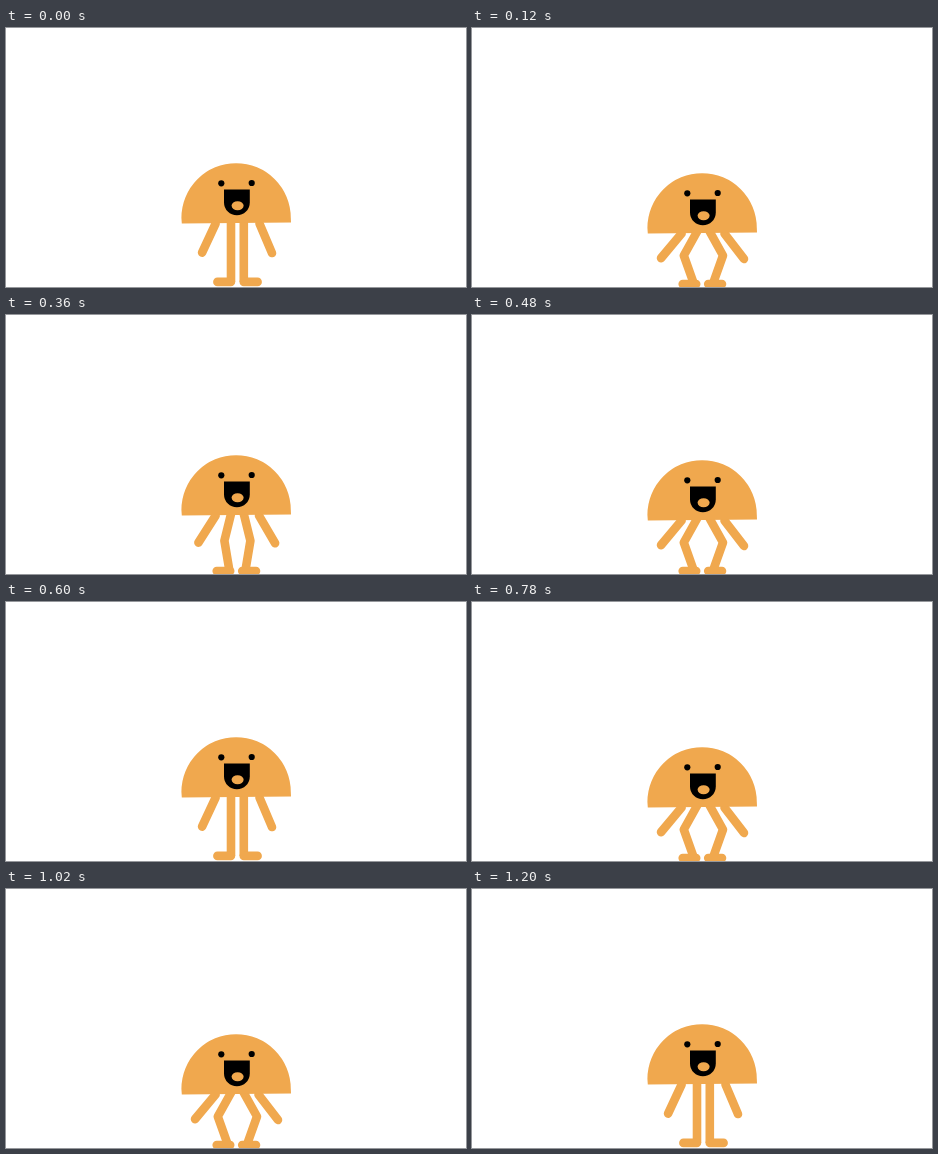
An HTML page for the animation above (1230 ms loop, 460 px wide and 259 px high).

```html
<!DOCTYPE html>
<html lang="en">
<head>
<meta charset="utf-8">
<title>Bouncing character</title>
<style>
  html, body { margin: 0; width: 100%; height: 100%; overflow: hidden; background: #fff; }
  svg { display: block; }
  .limb { fill: none; stroke: #f0a84e; stroke-width: 8.6; stroke-linejoin: round; }
  .round { stroke-linecap: round; }
</style>
</head>
<body>
<svg width="460" height="259" viewBox="0 0 460 259">
  <path id="legs" class="limb"/>
  <path id="feet" class="limb round"/>
  <path id="arms" class="limb round"/>
  <g id="body">
    <path fill="#f0a84e" d="M175.8 195.5L175.4 189.8A54.7 54.7 0 0 1 284.8 189.8L285 194.5Z"/>
    <circle cx="215.3" cy="155.3" r="3.1"/>
    <circle cx="245.7" cy="155" r="3.1"/>
    <path d="M218 161.6H243.8V174.4A12.9 12.9 0 0 1 218 174.4Z"/>
    <ellipse cx="231.6" cy="177.7" rx="6" ry="4.5" fill="#f0a84e"/>
  </g>
</svg>
<script>
const FRAME = 30, LOOP = 1230, BOUNCE = 10, DROP = 2.5;
const el = id => document.getElementById(id);
const setPath = (id, d) => el(id).setAttribute('d', d);

function arm(x, y, degrees) {
  const a = degrees * Math.PI / 180;
  return `M${x} ${y}L${x + 32 * Math.sin(a)} ${y + 32 * Math.cos(a)}`;
}

// side is -1 for the left leg and 1 for the right
function leg(side, drop, footY) {
  const x = 231.4 + side * 6.4;
  const hip = x - side * 0.1 * drop;
  const knee = x + side * 1.32 * drop;
  const ankle = x + side * 0.3 * drop;
  return `M${hip} ${192 + drop}L${knee} ${224 + 0.35 * drop}L${ankle} ${footY}`;
}

function draw(now) {
  const step = Math.floor(now % LOOP / FRAME) % BOUNCE;
  const drop = DROP * Math.min(step, BOUNCE - step);
  const bend = Math.min(drop / 5, 1);
  const footY = 253.9 + 2.2 * bend;
  const leftFoot = 211.4 - 0.7 * bend, rightFoot = 237.8 - 1.6 * bend;

  el('body').setAttribute('transform', `translate(0 ${drop})`);
  setPath('legs', leg(-1, drop, footY) + leg(1, drop, footY));
  setPath('feet', `M${leftFoot} ${footY}h13.5M${rightFoot} ${footY}h13.8`);
  setPath('arms', arm(209.6, 195.6 + drop, -25 - 1.5 * drop) +
                  arm(253.5 - 0.1 * drop, 195.6 + drop, 23 + 1.45 * drop));
}

const start = performance.now();
function tick() {
  draw(performance.now() - start);
  requestAnimationFrame(tick);
}
tick();
</script>
</body>
</html>
```
